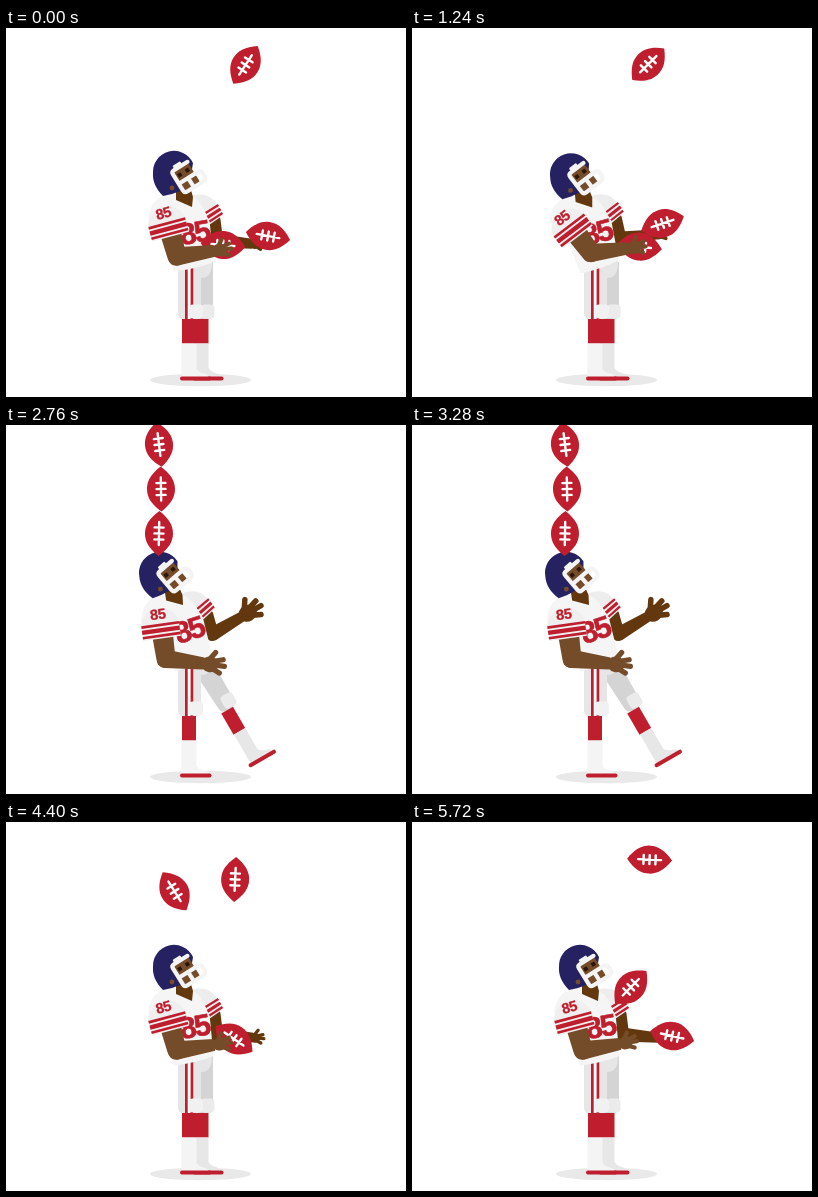
Recreate the animation shown at these times as an HTML page. Size 400 px wide and 369 px high, loop 5.76 s.

```html
<!DOCTYPE html>
<html lang="en">
<head>
<meta charset="utf-8">
<title>Juggling player</title>
<style>
  html, body { margin: 0; width: 100%; height: 100%; overflow: hidden; background: #fff; }
  svg { display: block; width: 100vw; height: 100vh; }
  text { font: bold 30px "Liberation Sans", Arial, sans-serif; letter-spacing: -.07em; text-anchor: middle; fill: #be1e2d; stroke: #be1e2d; stroke-width: .6; }
  .small { font-size: 14.5px; stroke-width: .3; letter-spacing: -.03em; }
  .red { fill: #be1e2d; }
  .skin { fill: #754c29; }
  .dark { fill: #63380f; }
  .line { fill: none; stroke-linecap: round; stroke-linejoin: round; }
  .sole { stroke: #be1e2d; stroke-width: 4; }
  .mask { stroke: #f4f4f4; stroke-width: 4.2; }
  .lace { stroke: #fff; stroke-width: 2.4; }
  .stripe { stroke: #be1e2d; fill: none; }
</style>
</head>
<body>
<svg viewBox="0 0 400 369">
  <defs>
    <g id="ball">
      <path class="red" d="M-22.5 0C-15 -10 -8 -14 0 -14S15 -10 22.5 0C15 10 8 14 0 14S-15 10 -22.5 0Z"/>
      <path class="line lace" d="M-11.5 0H11.5M-6 -4.5V4.5M0 -4.5V4.5M6 -4.5V4.5"/>
    </g>
    <g id="hand">
      <ellipse cx="6" rx="8.5" ry="7.5" stroke="none"/>
      <path class="line" stroke-width="5" d="M4 -3L10 -12M8 -3L18 -6M8 0H20M7 3L16 7"/>
    </g>
  </defs>

  <ellipse cx="194.5" cy="352" rx="50.5" ry="6.3" fill="#e9e9e9"/>

  <g id="leg">
    <path fill="#d4d4d4" d="M186 234H207V285Q207 291 201 291H195Q189 291 189 285Z"/>
    <rect class="red" x="189" y="291" width="13.5" height="24.5"/>
    <path fill="#e7e7e7" d="M189.5 315.5H202.5V340Q205 344 210 345Q214 346 214 349H189.5Z"/>
    <path class="line sole" d="M188.5 350.5H215.5"/>
    <rect x="195" y="276.5" width="13.5" height="14" rx="4" fill="#ebebeb"/>
  </g>

  <path fill="#e6e6e6" d="M172 232H206Q207 250 195 250V285Q195 291.5 188 291.5H178Q172 291.5 172 285Z"/>
  <rect x="179" y="238" width="8.4" height="53.5" fill="#fff"/>
  <path class="red" d="M179 238h2.7v53.5h-2.7zM184.6 238h2.7v53.5h-2.7z"/>
  <rect x="183" y="276.5" width="14" height="14" rx="4" fill="#f1f1f1"/>
  <rect class="red" x="176" y="291" width="14" height="24.5"/>
  <path fill="#f4f4f4" d="M175.5 315.5H190.5V341Q193 344.5 198 345.5Q202.5 346.5 202.5 349H175.5Z"/>
  <path class="line sole" d="M176 350.5H203.5"/>

  <g id="body">
    <path class="line" stroke="#63380f" stroke-width="13" d="M208 192L210.5 212"/>
    <g id="farArm" class="dark" stroke="#63380f">
      <path stroke="none" d="M-6 -4Q-4 -7 2 -6.5L37 -5V5L1 7.5Q-5 7 -6 2Z"/>
      <use id="farHand" href="#hand"/>
    </g>
    <path fill="#ededed" d="M184 168C199 164 207 169 211 177L217.5 187L203 197L188 190Z"/>
    <path class="stripe" stroke-width="2.2" d="M199.5 185L212.5 177M203.5 193.5L216.5 185"/>
    <path class="stripe" stroke-width="3.2" d="M201.5 189.3L214.5 181"/>
    <path fill="#f5f5f5" d="M157 168C166 165 178 166 186 168Q197 174 201 190L204 197L207.5 234Q190 241 168 243.5L160 215L142 190Q145 172 157 168Z"/>
    <text transform="translate(188 204) rotate(-10)" y="10.8">85</text>
    <path class="dark" d="M170 160L185 162L187 169L186 179L170 172Z"/>
    <path fill="#262262" d="M157 168C149 160 146.500 152 147 145A21 21 0 0 1 187 135L183 160L166 166Z"/>
    <g transform="translate(178 149) rotate(-32)">
      <rect class="skin" x="-8" y="-12" width="19" height="26" rx="3"/>
      <path fill="#2b1608" d="M-4.500 -6h4v4h-4zM4.500 -6h4v4h-4z"/>
      <path class="line mask" d="M11 -11H-5Q-8 -11 -8 -8V11Q-8 14 -5 14H13Q18 14 18 9V7Q18 3 14 3H-7M3 4V13"/>
      <rect x="-4" y="-15.500" width="9" height="5" rx="1" fill="#f4f4f4"/>
    </g>
    <circle class="skin" cx="166" cy="160" r="2.400"/>
  </g>

  <g id="balls"><use href="#ball"/><use href="#ball"/><use href="#ball"/></g>

  <g id="upperArm">
    <path class="skin" d="M-10 10H11L10 36A9.500 9.500 0 0 1 -9 36Z"/>
    <path fill="#efefef" d="M-19.500 15.500V0A19.500 19.500 0 0 1 18.500 0V15.500Z"/>
    <path class="red" d="M-19.500 .5h38v2.700h-38zM-19.500 5h38v4.500h-38zM-19.500 11.300h38v2.700h-38z"/>
    <text class="small" x="-1.500" y="-4">85</text>
  </g>
  <g id="foreArm" class="skin" stroke="#754c29">
    <path stroke="none" d="M-9 0Q-9 -8 0 -9L38 -6V6L0 9.500Q-9 9 -9 0Z"/>
    <use id="nearHand" href="#hand"/>
  </g>
</svg>

<script>
const LOOP = 5760, STEP = 40, HALF = 3000;
const UP = .92, DOWN = 1.08, APEX = 36;   // flight in beats around its top
const NEAR = { in: [217, 217], out: [228, 217], dip: 13 };
const FAR = { in: [251, 208], out: [262, 208], dip: 12 };

const $ = id => document.getElementById(id);
const mix = (a, b, p) => a + (b - a) * p;
const mod = (a, n) => ((a % n) + n) % n;
const clamp = (v, lo, hi) => Math.min(hi, Math.max(lo, v));
const hump = p => Math.sin(Math.PI * p);

function ramp(t, t0, t1) {
  const p = clamp((t - t0) / (t1 - t0), 0, 1);
  return p * p * (3 - 2 * p);
}

// 0 to 1 over a..b, back to 0 over c..d
const pulse = (t, a, b, c, d) => ramp(t, a, b) - ramp(t, c, d);

function turn([x, y], deg) {
  const r = deg * Math.PI / 180, c = Math.cos(r), s = Math.sin(r);
  return [x * c - y * s, x * s + y * c];
}

// Beat counter of the cascade; on each whole beat one ball is at its top
const beat = t => t < HALF ? (t + 20) / 250 : (t - 5740) / 229;
// Stops the count while the balls are on the head
const heldBeat = (t, last, first) => t < HALF ? Math.min(beat(t), last) : Math.max(beat(t), first);

const leanAt = t => pulse(t, 1050, 1370, 3560, 4060);

// Cascade: flights between beats -5 and 6, then balls wait in the hand
function juggle(j, t) {
  const k = beat(t), slot = mod(1 - j, 3);
  let n = Math.floor((k + UP - slot) / 3) * 3 + slot;
  while (t < HALF && n > 6) n -= 3;
  while (t >= HALF && n < -5) n += 3;
  const u = Math.max(k - n, -UP), even = mod(n, 2) === 0;
  const [from, to] = even ? [NEAR, FAR] : [FAR, NEAR];
  if (u >= DOWN) {
    const w = Math.min(u - DOWN, 1);
    return [
      mix(to.in[0], to.out[0], w),
      mix(to.in[1], to.out[1], w) + to.dip * hump(w),
      5 + 15 * hump(w)
    ];
  }
  const [x0, y0] = from.out, [x1, y1] = to.in;
  const left = 1 - (u + UP) / 2;
  return [
    mix(x1, x0, left ** (even ? 1 : 1.3)),
    u < 0 ? mix(APEX, y0, (u / UP) ** 2) : mix(APEX, y1, (u / DOWN) ** 2),
    even ? 66 + 720 * u - 105 * u * u : -20 - 620 * u
  ];
}

// Balls on the head, j counted from the bottom
function stacked(j, t) {
  const up = 1 - leanAt(t), tip = ramp(t, 3600, 3800);
  return [
    153 + 11 * up + mix(2 * hump(j / 2), 1.5 * j * j, tip),
    108.5 - 4.5 * up - 44.5 * j,
    91 + j * j * mix(-2, 3.5, tip)
  ];
}

function arc(a, b, top, p) {
  const rise = Math.sqrt(a[1] - top), fall = Math.sqrt(b[1] - top);
  return [mix(a[0], b[0], p), top + (p * (rise + fall) - rise) ** 2, mix(a[2], b[2], p)];
}

const spun = ([x, y, r], extra) => [x, y, r + extra];

function ballAt(j, t) {
  const toss = 1470 + 335 * j, land = toss + 370;
  const drop = 3820 + 270 * (2 - j), caught = drop + 470;
  if (t < toss || t >= caught) return juggle(j, t);
  if (t < land) return arc(juggle(j, toss), spun(stacked(j, land), 180), 40 - 35 * j, (t - toss) / 370);
  if (t < drop) return stacked(j, t);
  return arc(stacked(j, drop), spun(juggle(j, caught), 360), 10, (t - drop) / 470);
}

const place = (el, x, y, r) => el.setAttribute("transform", `translate(${x} ${y}) rotate(${r})`);
const open = (el, x, size) => el.setAttribute("transform", `translate(${x} 0) scale(${size})`);
const balls = [...$("balls").children];

function drawFarArm(t, lean) {
  const v = mod(heldBeat(t, 7.08, -3.92) - 1.08, 2);
  const free = v > 1 ? hump(v - 1) : 0;
  const rest = pulse(t, 1800, 2700, 3600, 4450);
  const catching = v < 1 ? -4 + 10 * v + 3 * hump(v) : 16 - 10 * v - 16 * free;
  place($("farArm"), 210, 212, mix(catching, -30, rest) + lean);
  open($("farHand"), 35, mix(.65, 1.1, Math.max(free, rest)));
}

function drawNearArm(t, lean) {
  const [sx, sy] = turn([-27, -46.5], -lean), x = 188 + sx, y = 240 + sy;
  const swing = -15 - 30 * ramp(t, 1000, 1360) + 37 * ramp(t, 2150, 2600)
    + 8 * ramp(t, 3560, 3800) - 15 * ramp(t, 3800, 4100);
  const [ex, ey] = turn([.5, 36], swing);
  const dip = hump(mod(heldBeat(t, 6.08, -4.92) - .08, 2));
  const rest = pulse(t, 2200, 2650, 4000, 4290);
  const toss = pulse(t, 2120, 2220, 2220, 2450);
  place($("upperArm"), x, y, swing);
  place($("foreArm"), x + ex, y + ey, mix(-8 + (dip > 0 ? 11 : 3) * dip, 7.5, rest) - 20 * toss);
  open($("nearHand"), 38, mix(.85, 1.05, rest));
}

function draw(t) {
  const lean = 8.5 * leanAt(t), kick = 30 * pulse(t, 1260, 1780, 3660, 4240);
  $("body").setAttribute("transform", `rotate(${-lean} 188 240)`);
  $("leg").setAttribute("transform", `rotate(${-kick} 197.3 240.7)`);
  drawFarArm(t, lean);
  drawNearArm(t, lean);
  balls.forEach((el, j) => place(el, ...ballAt(j, t)));
}

const start = performance.now();
function tick() {
  const t = (performance.now() - start) % LOOP;
  draw(Math.floor(t / STEP) * STEP);
  requestAnimationFrame(tick);
}
tick();
</script>
</body>
</html>
```
